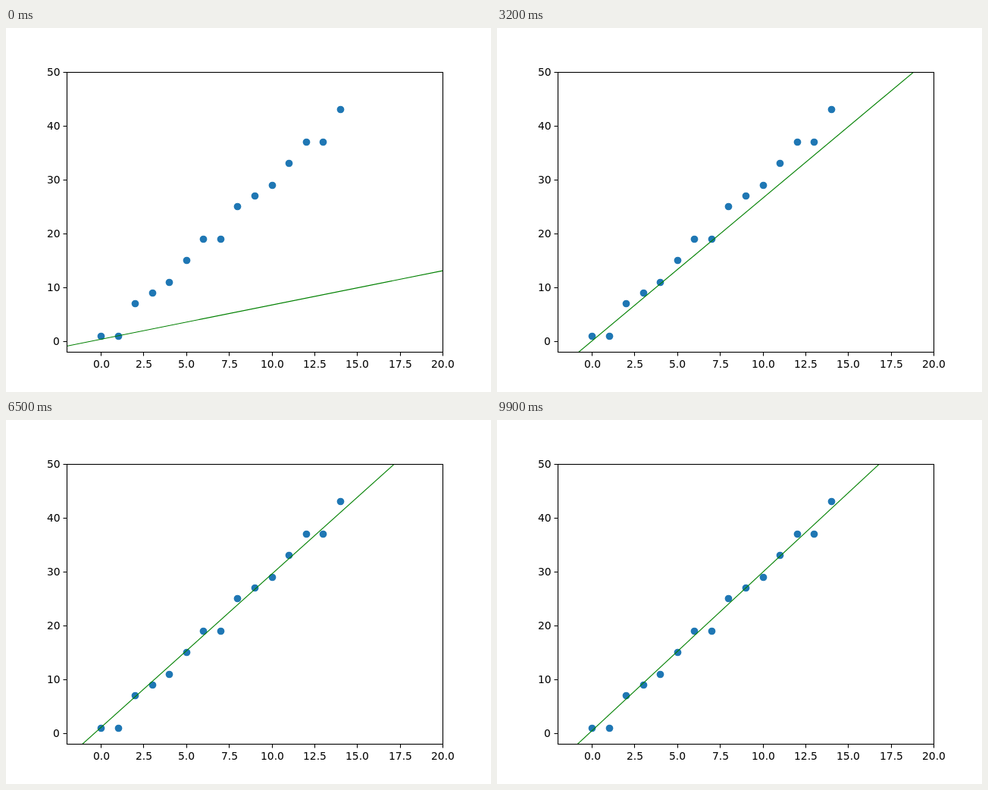
An HTML page that plays this animation: 640x480 px, repeating every 10000 ms.

```html
<!DOCTYPE html>
<html lang="en">
<head>
<meta charset="utf-8">
<title>Line fit</title>
<style>
html, body { margin: 0; width: 100%; height: 100%; overflow: hidden; background: #fff; }
svg { display: block; width: 640px; height: 480px; }
text { font: 13.89px "DejaVu Sans", sans-serif; fill: #000; }
.axis { fill: none; stroke: #000; stroke-width: 1.11; }
#dots { fill: #1f77b4; }
#fit { stroke: #008000; stroke-width: 1.11; }
</style>
</head>
<body>
<svg viewBox="0 0 640 480">
  <defs><clipPath id="area"><rect x="80" y="58" width="496.5" height="369.5"/></clipPath></defs>
  <g id="dots"></g>
  <g clip-path="url(#area)"><line id="fit"/></g>
  <g id="axes"><rect class="axis" x="80.5" y="58.5" width="496" height="369"/></g>
</svg>
<script>
const STEP = 100, COUNT = 100;
const px = x => 80 + (x + 2) * 496 / 22;
const py = y => 427.2 - (y + 2) * 369.6 / 52;
const snap = v => Math.round(v) + 0.5;

// Samples follow y = 3x plus a repeating error.
const errors = [1, -2, 1, 0, -1, 0];
const sample = x => 3 * x + errors[x % errors.length];

// Key poses of the line: step, slope, intercept
const poses = [
  [0, 0.635, 0.36], [20, 2.008, 1.03], [32, 2.65, 0.01], [52, 2.811, 1],
  [65, 2.846, 1.04], [78, 2.976, 0.06], [99, 2.942, 0.43]
];

const byId = id => document.getElementById(id);
const dots = byId("dots"), axes = byId("axes"), fit = byId("fit");

function add(parent, tag, attrs, text) {
  const node = document.createElementNS("http://www.w3.org/2000/svg", tag);
  for (const key in attrs) node.setAttribute(key, attrs[key]);
  if (text) node.textContent = text;
  parent.appendChild(node);
  return node;
}

// Labels start on whole pixels; align is 0.5 for centred, 1 for right.
function label(x, y, align, text) {
  const node = add(axes, "text", { y }, text);
  const ink = node.getComputedTextLength() - 1;
  node.setAttribute("x", Math.round(x - ink * align));
}

for (let x = 0; x < 15; x++) {
  add(dots, "circle", { cx: snap(px(x)), cy: snap(py(sample(x))), r: 4.86 });
}
for (let v = 0; v <= 20; v += 2.5) {
  add(axes, "path", { class: "axis", d: `M${snap(px(v))} 427.5v5` });
  label(px(v), 448, 0.5, v.toFixed(1));
}
for (let v = 0; v <= 50; v += 10) {
  add(axes, "path", { class: "axis", d: `M80.5 ${snap(py(v))}h-5` });
  label(70.3, Math.round(py(v)) + 5, 1, String(v));
}

function noise(n) {
  const s = Math.sin(n * 127.1 + 31.7) * 43758.5453;
  return s - Math.floor(s);
}

// Ease between key poses; in between, the line wobbles about x = 10.
function fitAt(n) {
  const i = Math.max(1, poses.findIndex(p => p[0] >= n));
  const [start, w0, b0] = poses[i - 1];
  const [end, w1, b1] = poses[i];
  const k = (n - start) / (end - start);
  const ease = 1 - (1 - k) ** 3;
  const shake = k > 0 && k < 1 ? 2 * noise(n) ** 4 : 0;
  return [w0 + (w1 - w0) * ease - shake / 10, b0 + (b1 - b0) * ease + shake];
}

fit.setAttribute("x1", px(-2));
fit.setAttribute("x2", px(20));

function draw() {
  const n = Math.floor(performance.now() / STEP) % COUNT;
  const [w, b] = fitAt(n);
  fit.setAttribute("y1", py(b - 2 * w));
  fit.setAttribute("y2", py(b + 20 * w));
  requestAnimationFrame(draw);
}
draw();
</script>
</body>
</html>
```
